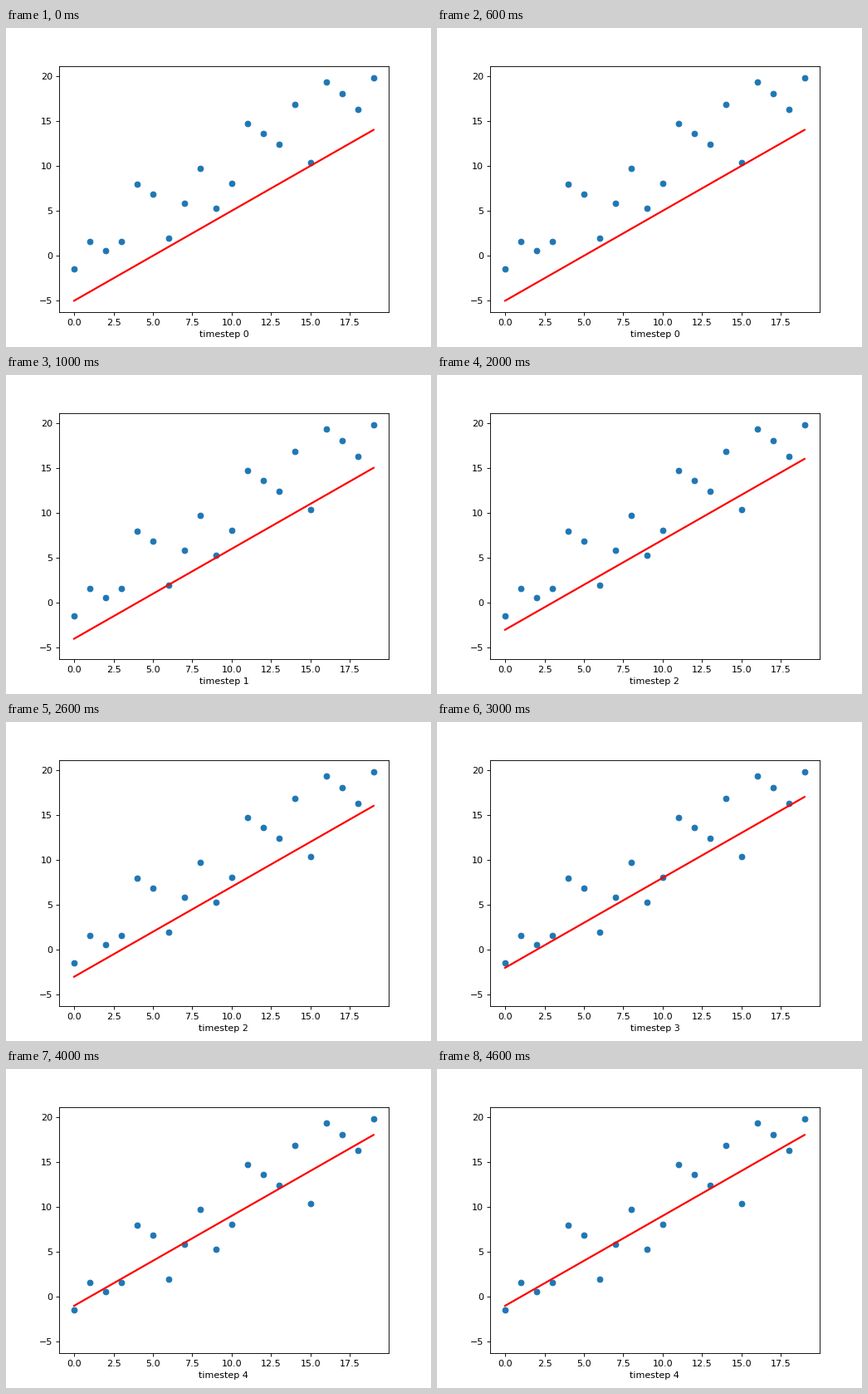
A matplotlib script for the animation above (5000 ms loop, 512x384 px).

```python
import numpy as np
import matplotlib.pyplot as plt
from matplotlib.animation import FuncAnimation

fig, ax = plt.subplots(figsize=(6.4, 4.8), dpi=80)

x = np.arange(20)
y = [-1.5, 1.57, 0.57, 1.57, 7.98, 6.85, 1.95, 5.83, 9.73, 5.28,
     8.05, 14.72, 13.6, 12.4, 16.85, 10.37, 19.35, 18.05, 16.3, 19.83]

ax.scatter(x, y)
line, = ax.plot(x, x - 5, "r-", linewidth=2)


def update(step):
    line.set_ydata(x - 5 + step)
    ax.set_xlabel(f"timestep {step}")
    return line, ax


anim = FuncAnimation(fig, update, frames=5, interval=1000, repeat=True)
plt.show()
```
